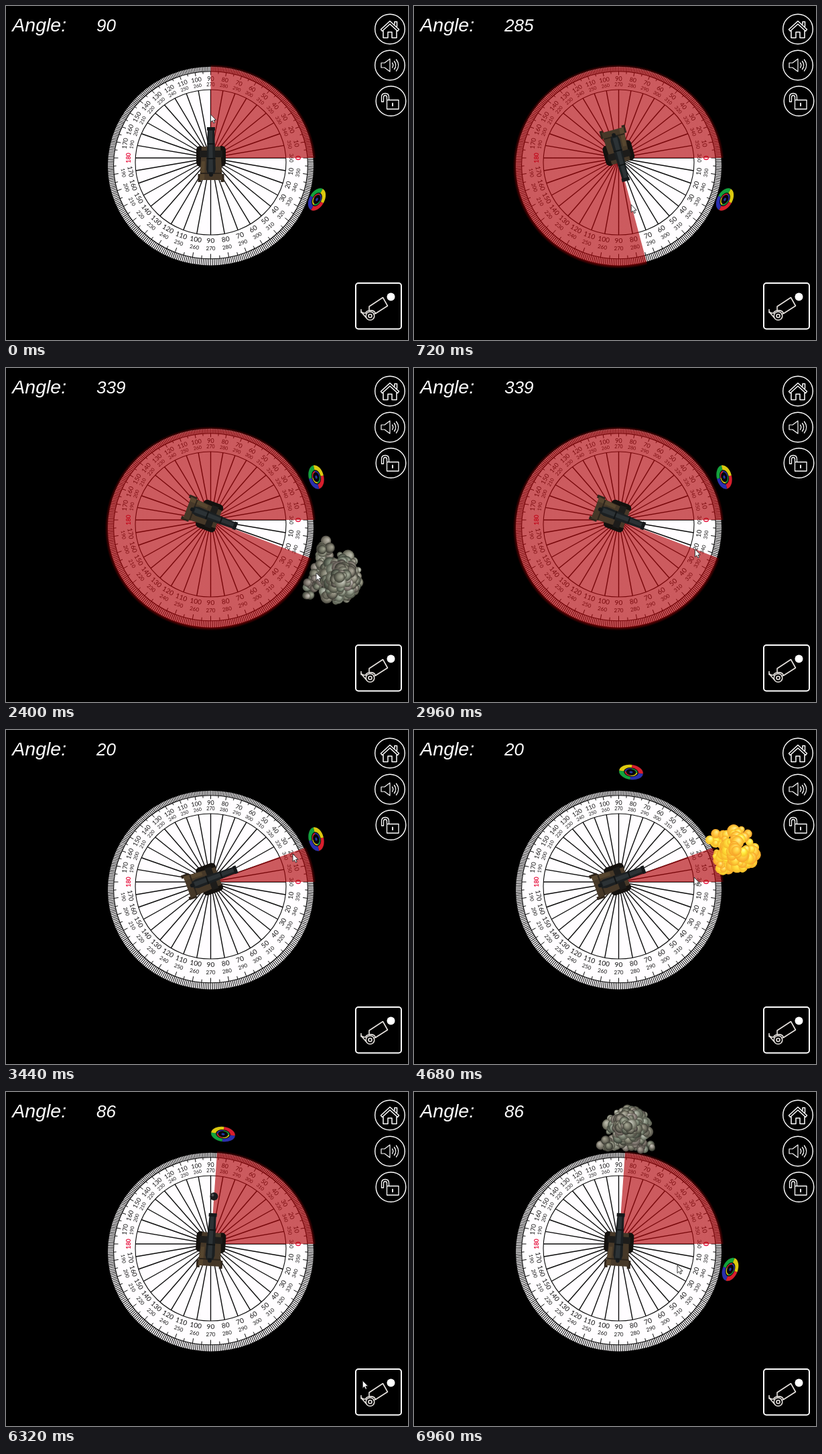
These frames come from a looping animation (600x499 px, 7 s). An HTML page with a canvas:

```html
<!DOCTYPE html>
<html lang="en">
<head>
<meta charset="utf-8">
<title>Cannon angles</title>
<style>
  html, body { margin: 0; width: 100%; height: 100%; overflow: hidden; background: #000; }
  canvas { display: block; }
</style>
</head>
<body>
<canvas id="stage" width="600" height="499"></canvas>
<script>
const LOOP = 7000, STEP = 40, CX = 305.5, CY = 227, TAU = Math.PI * 2;
const SANS = '"Liberation Sans", Arial, sans-serif';
const DIAL = 'Lato, "Open Sans", sans-serif';
const ctx = document.getElementById('stage').getContext('2d');
const rad = d => d * Math.PI / 180;

// Timelines: [ms, value...]
const ANGLE = [[0, 90], [720, 285], [1000, 339], [2960, 339], [3080, 360], [3280, 380],
  [4800, 380], [5080, 388], [5360, 437], [5520, 446]];
const POINTER = [[1000, 376, 254], [1440, 544, 453], [1880, 544, 453], [2400, 463, 306],
  [2960, 420, 271], [3280, 428, 185], [3440, 428, 185], [3640, 544, 453], [3960, 544, 453],
  [4400, 430, 255], [4560, 418, 220], [4680, 418, 220], [4800, 411, 189], [5520, 314, 109],
  [5800, 438, 308], [5960, 544, 453], [6280, 544, 453], [6560, 462, 300], [6960, 393, 259]];
// Drags: start, end, radius at start, radius at end
const DRAGS = [[0, 1000, 65, 75], [2960, 3280, 122, 129], [4800, 5520, 112, 118]];
const TARGETS = [[0, 464, 289], [1880, 463, 163], [4400, 324, 63], [6560, 472, 265]];
const SHOTS = [
  { press: 1520, fire: 1600, hit: 1880, dir: -21, x: 488, y: 307 },
  { press: 3760, fire: 4080, hit: 4400, dir: 20, x: 475, y: 176 },
  { press: 6120, fire: 6240, hit: 6560, dir: 86, x: 317, y: 58 }
];

function along(keys, t) {
  let i = 0;
  while (i < keys.length - 1 && keys[i + 1][0] <= t) i++;
  const a = keys[i], b = keys[i + 1] || a;
  const k = b === a ? 0 : Math.max(0, (t - a[0]) / (b[0] - a[0]));
  return a.slice(1).map((v, n) => v + (b[n + 1] - v) * k);
}

function seeded(s) {
  return () => {
    s = (s + 0x6D2B79F5) | 0;
    let v = Math.imul(s ^ (s >>> 15), 1 | s);
    v = (v + Math.imul(v ^ (v >>> 7), 61 | v)) ^ v;
    return ((v ^ (v >>> 14)) >>> 0) / 4294967296;
  };
}

function disc(g, x, y, r, fill) {
  g.beginPath();
  g.arc(x, y, r, 0, TAU);
  g.fillStyle = fill;
  g.fill();
}

function poly(g, pts, fill) {
  g.beginPath();
  pts.forEach(p => g.lineTo(p[0], p[1]));
  g.closePath();
  g.fillStyle = fill;
  g.fill();
}

function box(x, y, w, h, fill) {
  ctx.fillStyle = fill;
  ctx.fillRect(x, y, w, h);
}

// The dial leans back a little: a perspective with its near edge at the bottom.
const LEAN = 0.000533, SQUASH = 0.963;

function project(deg, r) {
  const x = r * Math.cos(rad(deg)), y = -r * Math.sin(rad(deg));
  const size = 1 / (1 - LEAN * y);
  return { x: CX + x * size, y: CY + SQUASH * y * size, size };
}

// A circle around the pivot projects to an ellipse with a lower centre.
function oval(r) {
  const top = project(90, r).y, bottom = project(-90, r).y;
  return { y: (top + bottom) / 2, rx: r / Math.sqrt(1 - (LEAN * r) ** 2), ry: (bottom - top) / 2 };
}

function traceOval(g, r) {
  const o = oval(r);
  g.beginPath();
  g.ellipse(CX, o.y, o.rx, o.ry, 0, 0, TAU);
}

function label(g, text, deg, r, font, inward, color = '#111') {
  const p = project(deg, r), q = project(deg, r + 5);
  g.save();
  g.translate(p.x, p.y);
  g.rotate(Math.atan2(q.y - p.y, q.x - p.x) + (inward ? -1 : 1) * Math.PI / 2);
  g.scale(p.size, p.size);
  g.font = font;
  g.fillStyle = color;
  g.fillText(text, 0, 0);
  g.restore();
}

function spoke(g, deg, from, to, width) {
  const a = project(deg, from), b = project(deg, to);
  g.beginPath();
  g.moveTo(a.x, a.y);
  g.lineTo(b.x, b.y);
  g.lineWidth = width;
  g.stroke();
}

function makeDial() {
  const c = document.createElement('canvas');
  c.width = 600;
  c.height = 499;
  const g = c.getContext('2d');
  g.textAlign = 'center';
  g.textBaseline = 'middle';
  g.strokeStyle = '#0a0a0a';
  const big = '9.5px ' + DIAL, small = '7.5px ' + DIAL;
  traceOval(g, 153);
  g.fillStyle = '#fffdff';
  g.fill();
  g.lineWidth = 1.1;
  for (const r of [112.3, 144.5]) {
    traceOval(g, r);
    g.stroke();
  }
  for (let d = 0; d < 360; d++) {
    spoke(g, d, 144.5, 154, 1.05);
    if (d % 5 === 0) spoke(g, d, d % 10 ? 140.5 : 138, 145, 1);
    if (d % 10) continue;
    spoke(g, d, 0, 112.3, 1.4);
    if (d % 180 === 0) continue;
    const low = d > 180;
    label(g, low ? 360 - d : d, d, low ? 120.5 : 131, big, low);
    label(g, low ? d : 360 - d, d, low ? 131 : 120.5, small, low);
  }
  label(g, '180', 180, 122.5, '700 9px ' + DIAL, false, '#e6103c');
  label(g, '0', 0, 130, '700 12px ' + DIAL, false, '#e6103c');
  label(g, '360', 0, 119.5, small, false);
  return c;
}

function drawWedge(deg) {
  if (deg <= 0) return;
  const o = oval(157.5);
  ctx.save();
  ctx.beginPath();
  ctx.moveTo(CX, CY);
  ctx.arc(CX, CY, 300, 0, -rad(deg), true);
  ctx.closePath();
  ctx.clip();
  ctx.translate(CX, o.y);
  ctx.scale(o.rx, o.ry);
  const fade = ctx.createRadialGradient(0, 0, 0, 0, 0, 1);
  fade.addColorStop(0, 'rgba(180,5,10,.65)');
  fade.addColorStop(0.965, 'rgba(175,3,8,.65)');
  fade.addColorStop(1, 'rgba(140,0,0,0)');
  disc(ctx, 0, 0, 1, fade);
  ctx.restore();
}

function drawCannon(deg) {
  ctx.save();
  ctx.translate(306, 222);
  ctx.rotate(rad(90 - deg));
  for (const s of [-1, 1]) {
    ctx.beginPath();
    ctx.roundRect(s * 16 - 6, -13, 12, 31, 6);
    ctx.fillStyle = '#14110e';
    ctx.fill();
    box(s * 17 - 2.5, 29, 5, 12, '#2f251b');
  }
  poly(ctx, [[-14, -12], [14, -12], [17, 38], [-17, 38]], '#463828');
  poly(ctx, [[-14, 10], [-9, 10], [-10, 38], [-17, 38]], '#57462f');
  box(-16, 27, 32, 2, '#2c241b');
  box(-17, -6, 34, 10, '#1d1c1a');
  poly(ctx, [[-5, -39], [5, -39], [7, 22], [5, 29], [-5, 29], [-7, 22]], '#1b1f21');
  poly(ctx, [[-3, -38], [2, -38], [3, 26], [-4, 26]], '#2c3235');
  box(-6, -41, 12, 5, '#15181a');
  box(-5.5, -17, 11, 2, '#121516');
  box(-6.5, 5, 13, 2, '#121516');
  disc(ctx, 0, 30, 3, '#15181a');
  ctx.restore();
}

function drawTarget(x, y) {
  ctx.save();
  ctx.translate(x, y);
  ctx.rotate(Math.atan2(y - 200, x - CX) + Math.PI / 2);
  ctx.scale(1, 0.62);
  const hues = ['#d81e2c', '#2a2fae', '#12a23c', '#dcc90f'];
  disc(ctx, 0, 0, 18.5, '#111');
  hues.forEach((c, i) => {
    const a = (i - 1) * Math.PI / 2;
    ctx.strokeStyle = c;
    ctx.lineWidth = 7;
    ctx.beginPath();
    ctx.arc(0, 0, 14.5, a, a + Math.PI / 2);
    ctx.stroke();
    ctx.lineWidth = 2;
    ctx.beginPath();
    ctx.arc(0, 0, 8.5, a + Math.PI, a + Math.PI * 1.5);
    ctx.stroke();
  });
  disc(ctx, 0, 0, 7, '#05050c');
  disc(ctx, 0, 0, 2.5, '#2638a8');
  ctx.restore();
}

function puff(x, y, r, tones) {
  const g = ctx.createRadialGradient(x - r * 0.3, y - r * 0.35, r * 0.1, x, y, r);
  tones.forEach((c, i) => g.addColorStop(i / (tones.length - 1), c));
  disc(ctx, x, y, r, g);
}

// A wide foot of small puffs below a round head of larger ones.
function cloud(rnd, count, foot, size, lift, tones) {
  for (let i = 0; i < count; i++) {
    puff((rnd() * 2 - 1) * foot, 13 + rnd() * 15, size * (0.7 + rnd() * 0.7), tones());
  }
  for (let i = 0; i < count * 2.5; i++) {
    const a = rnd() * TAU, r = Math.sqrt(1 - i / count / 2.5) * (26 + rnd() * 4);
    puff(4 + Math.cos(a) * r * 1.12, -8 - lift + Math.sin(a) * r * 0.92,
      size * (0.8 + rnd() * 0.9), tones());
  }
}

function drawFire(age) {
  const rnd = seeded(23);
  const s = Math.min(1, 0.3 + age / 400);
  ctx.scale(s, s);
  cloud(rnd, 26, 29, 6, -1, () => {
    const warm = 42 + rnd() * 12;
    return [`hsl(${warm + 6},100%,${68 + rnd() * 12}%)`, `hsl(${warm},100%,62%)`, `hsl(${warm - 8},92%,56%)`];
  });
}

function drawSmoke(age) {
  const rnd = seeded(5);
  const s = 1 + (age - 400) / 900;
  ctx.scale(s, s);
  ctx.globalAlpha = Math.min(1, (720 - age) / 160);
  cloud(rnd, 46, 41, 5, (age - 400) / 40, () => {
    const hue = 25 + rnd() * 70, light = 58 + rnd() * 18;
    return [`hsl(${hue},9%,${light}%)`, `hsl(${hue},7%,${light - 16}%)`, `hsl(${hue},8%,${light - 40}%)`];
  });
}

function drawShot(shot, t) {
  if (t >= shot.fire && t < shot.hit) {
    const r = 45 + 105 * (t - shot.fire) / (shot.hit - shot.fire);
    const x = CX + r * Math.cos(rad(shot.dir)), y = CY - r * Math.sin(rad(shot.dir));
    disc(ctx, x, y, 6, '#1b1b1d');
    disc(ctx, x - 2, y - 2, 2, '#55565a');
  }
  const age = t - shot.hit;
  if (age < 0 || age >= 720) return;
  ctx.save();
  ctx.translate(shot.x, shot.y);
  ctx.rotate(rad(90 - shot.dir));
  if (age < 340) drawFire(age);
  else drawSmoke(age);
  ctx.restore();
}

function line(d, width = 1.6) {
  ctx.lineWidth = width;
  ctx.stroke(new Path2D(d));
}

function drawIcons(pressed) {
  ctx.save();
  ctx.strokeStyle = '#fff';
  ctx.lineJoin = ctx.lineCap = 'round';
  for (const [x, y] of [[573, 34.5], [573, 88.5], [574.5, 142]]) {
    ctx.beginPath();
    ctx.arc(x, y, 22.3, 0, TAU);
    ctx.lineWidth = 1.4;
    ctx.stroke();
  }
  line('M559.5 35L573 22.5 586.5 35 584.5 37.5 573 27 561.5 37.5Z M563 37V47.5H570V39H576V47.5H583V37 M580 27V23.5H583.5V30.5', 1.5);
  line('M560 85H565L573 79V98L565 92H560Z', 1.2);
  line('M576.5 85Q579 88.5 576.5 92 M579.5 82.5Q584 88.5 579.5 94.5 M582.5 80Q589 88.5 582.5 97', 1.3);
  line('M568.5 140.5H586V154H568.5Z M560.5 143V136Q560.5 130.5 566 130.5T571.5 136V140 M563.5 143V136.5Q563.5 133.5 566 133.5T568.5 136.5V140 M560.5 143H563.5', 1.3);
  line('M577 145.5V149', 2);

  if (pressed) ctx.globalAlpha = 0.65;
  ctx.beginPath();
  ctx.roundRect(522, 414, 68, 68.5, 4);
  ctx.lineWidth = 2;
  ctx.stroke();
  ctx.strokeStyle = '#e8e4e0';
  line('M542 449L562.5 435.5 569.5 448 551.5 459.5Q550 454 542 455Z');
  line('M542 455Q537 456 537 459 M530 456Q531 459 537 459 M530 453.5V458 M551 459L549 461 M531 458L537 465');
  for (const r of [6.3, 2.5]) {
    ctx.beginPath();
    ctx.arc(543.5, 463, r, 0, TAU);
    ctx.stroke();
  }
  disc(ctx, 574.5, 434.5, 6, '#fff');
  ctx.restore();
}

function drawPointer(t, deg) {
  let [x, y] = along(POINTER, t);
  const drag = DRAGS.find(d => t >= d[0] && t < d[1]);
  if (drag) {
    const [t0, t1, r0, r1] = drag;
    const r = r0 + (r1 - r0) * (t - t0) / (t1 - t0);
    x = CX + r * Math.cos(rad(deg));
    y = CY - r * Math.sin(rad(deg));
  }
  const shape = new Path2D('M0 0V11.5L2.6 9.2 4.4 13 6.2 12.2 4.6 8.4H8Z');
  ctx.save();
  ctx.translate(x, y);
  ctx.fillStyle = '#fff';
  ctx.strokeStyle = '#222';
  ctx.lineWidth = 0.9;
  ctx.fill(shape);
  ctx.stroke(shape);
  ctx.restore();
}

const dial = makeDial();

function draw(t) {
  const deg = along(ANGLE, t)[0] % 360;
  box(0, 0, 600, 499, '#000');
  ctx.drawImage(dial, 0, 0);
  drawWedge(deg);
  const spot = TARGETS.filter(k => k[0] <= t).pop();
  drawTarget(spot[1], spot[2]);
  drawCannon(deg);
  SHOTS.forEach(s => drawShot(s, t));
  ctx.fillStyle = '#fff';
  ctx.font = 'italic 28.5px ' + SANS;
  ctx.fillText('Angle:', 9.3, 38);
  ctx.font = 'italic 26px ' + SANS;
  ctx.fillText(Math.round(deg), 135, 38);
  drawIcons(SHOTS.some(s => t >= s.press && t < s.press + 80));
  drawPointer(t, deg);
}

const start = performance.now();
function tick() {
  const t = (performance.now() - start) % LOOP;
  draw(Math.floor(t / STEP) * STEP);
  requestAnimationFrame(tick);
}
tick();
</script>
</body>
</html>
```
